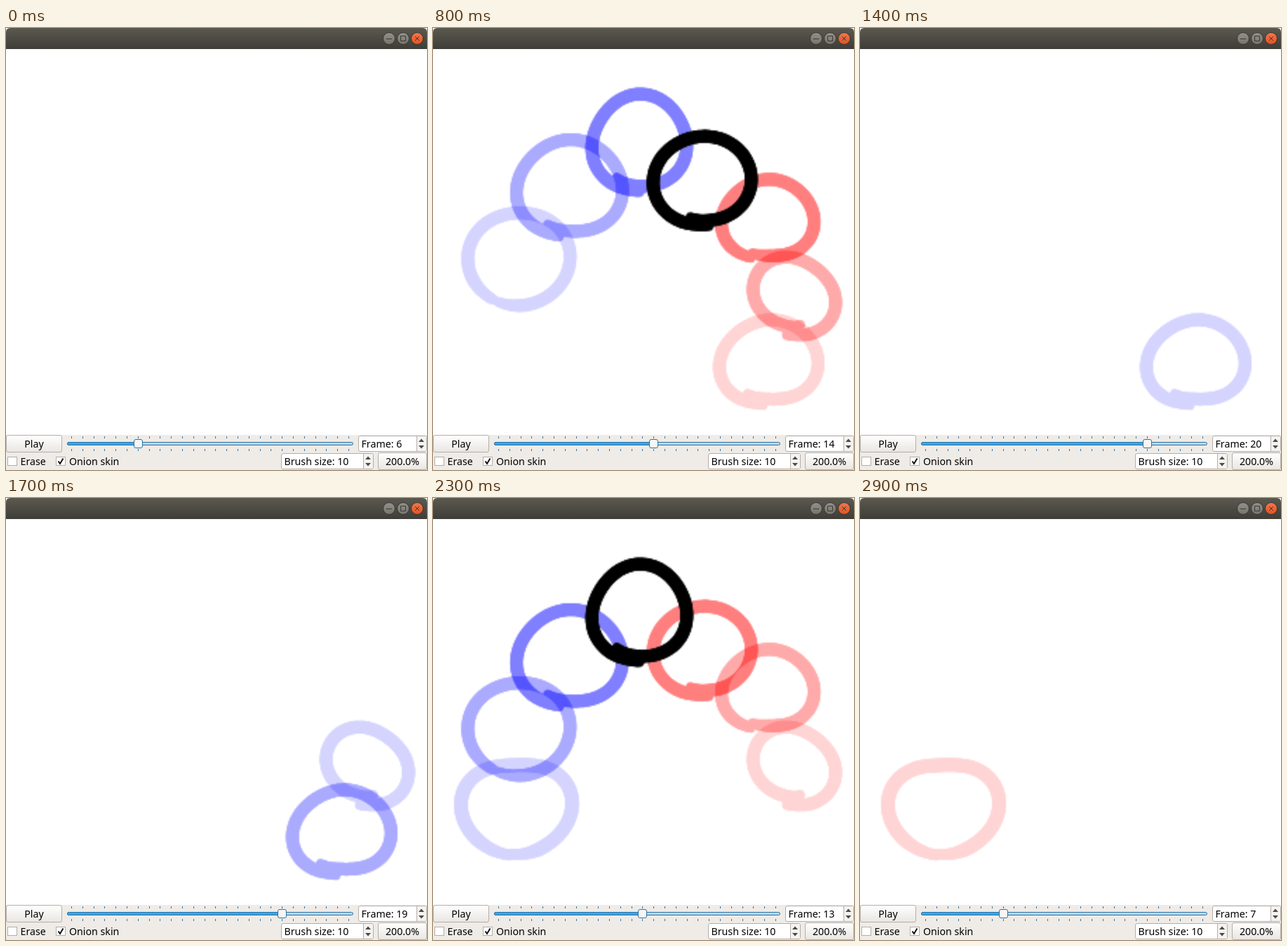
Recreate the animation shown at these times as an HTML page with a canvas. Size 600 by 630 pixels, loop 3000 ms.

```html
<!DOCTYPE html>
<html lang="en">
<head>
<meta charset="utf-8">
<title>Onion skin</title>
<style>
  html, body { margin: 0; width: 100%; height: 100%; overflow: hidden; background: #fff; }
  canvas { position: absolute; left: 0; top: 30px; width: 600px; height: 550px; }
  svg { position: absolute; left: 0; top: 0; }
  text { font: 14.2px "Noto Sans", sans-serif; fill: #000; }
  .edge { stroke: #b4aea8; }
  .blue { stroke: #2a75a8; }
  .icon { fill: none; stroke: #3a3934; }
</style>
</head>
<body>
<canvas id="view" width="300" height="275"></canvas>
<svg width="600" height="630">
  <defs>
    <linearGradient id="bar" x2="0" y2="1"><stop stop-color="#5b594f"/><stop offset="1" stop-color="#3e3d38"/></linearGradient>
    <linearGradient id="button" x2="0" y2="1"><stop stop-color="#fff"/><stop offset="1" stop-color="#e9e6e2"/></linearGradient>
    <linearGradient id="grey" x2="0" y2="1"><stop stop-color="#92908a"/><stop offset="1" stop-color="#75736b"/></linearGradient>
    <linearGradient id="orange" x2="0" y2="1"><stop stop-color="#f4784e"/><stop offset="1" stop-color="#e4511f"/></linearGradient>
    <path id="arrows" d="M-4 -2.5L0 -7L4 -2.5ZM-4 2.5L0 7L4 2.5Z" fill="#4b4a48"/>
  </defs>

  <path d="M0 30V6Q0 0 6 0H594Q600 0 600 6V30Z" fill="url(#bar)"/>
  <g stroke="#38372f">
    <circle cx="546" cy="15" r="8.5" fill="url(#grey)"/>
    <circle cx="566" cy="15" r="8.5" fill="url(#grey)"/>
    <circle cx="586" cy="15" r="8.5" fill="url(#orange)"/>
  </g>
  <path class="icon" d="M542 15.5H550M562.5 11.5H569.5V18.5H562.5ZM583 12L589 18M589 12L583 18"/>

  <rect y="580" width="600" height="50" fill="#efebe7"/>
  <g class="edge" fill="url(#button)">
    <rect x=".5" y="580.5" width="79" height="24" rx="2.5"/>
    <rect x="530.5" y="605.5" width="69" height="24" rx="2.5"/>
  </g>
  <g class="edge" fill="#fff">
    <rect x="502.5" y="581.5" width="97" height="22" rx="2.5"/>
    <rect x="392.5" y="606.5" width="131" height="22" rx="2.5"/>
    <rect x="2.5" y="611.5" width="13" height="12"/>
    <rect x="71.5" y="611.5" width="13" height="12"/>
    <path d="M585.5 582V603M509.5 607V628"/>
  </g>
  <path d="M586 582H597Q599 582 599 584V601Q599 603 597 603H586ZM510 607H521Q523 607 523 609V626Q523 628 521 628H510Z" fill="#f5f3f0"/>
  <use href="#arrows" x="592" y="592.5"/>
  <use href="#arrows" x="516" y="617.5"/>
  <path d="M74.5 617.5L77 621L81.5 613.5" fill="none" stroke="#111" stroke-width="2"/>

  <path id="ticks" class="blue"/>
  <rect class="blue" x="87.5" y="590.5" width="407" height="4" rx="2" fill="#bcd6e8"/>
  <rect class="blue" id="fill" x="87.5" y="590.5" height="4" rx="2" fill="#3fa5e6"/>
  <rect class="blue" id="handle" y="586.5" width="12" height="12" rx="2.5" fill="#f7f6f5"/>

  <text x="40" y="598" text-anchor="middle">Play</text>
  <text x="565" y="623" text-anchor="middle">200.0%</text>
  <text x="20.5" y="623">Erase</text>
  <text x="90" y="623">Onion skin</text>
  <text x="396.5" y="623">Brush size: 10</text>
  <text x="506.5" y="598" id="label"></text>
</svg>

<script>
const $ = id => document.getElementById(id);
const view = $('view').getContext('2d');
const scratch = document.createElement('canvas');
scratch.width = 300;
scratch.height = 275;
const pen = scratch.getContext('2d');
pen.lineCap = 'round';

// Hand-drawn loops by cel number: a wobbly circle, from `start` degrees for some turns
const cels = {
  10: { x: 119, y: 442, r: 71.5, oval: 7.5, bulge: -2.7, start: 98, turns: -1, curl: 1, width: 20 },
  11: { x: 122.5, y: 329, r: 69.5, oval: 3.4, bulge: -0.6, start: 116, turns: -.98, curl: 0 },
  12: { x: 195, y: 228, r: 71, oval: 4.2, start: 121, turns: -1.05, curl: 9 },
  13: { x: 294.5, y: 163.5, r: 67.3, oval: 0, start: 123, turns: -1.09, curl: 9 },
  14: { x: 384, y: 217, r: 66, oval: 4, lean: -1.3, bulge: .5, start: 108, turns: -1.07, curl: 8 },
  15: { x: 477.5, y: 273, r: 60.5, oval: 5.2, start: 115, turns: -1, curl: 4 },
  16: { x: 514.5, y: 381, r: 55.5, oval: 2.5, lean: 5.4, bulge: .4, start: 78, turns: 1.06, curl: 12 },
  17: { x: 479, y: 476, r: 64, oval: 6, lean: -1.6, start: 124, turns: -1.07, curl: 9 },
};

function drawCel({ x, y, r, oval, lean = -.8, bulge = 2, start, turns, curl, width = 18.5 }, color, alpha) {
  const steps = 120;
  // The stroke begins a little inside the loop and ends a little outside it
  const locate = u => {
    const a = start * Math.PI / 180 + u * turns * 2 * Math.PI;
    const radius = r + oval * Math.cos(2 * a) + lean * Math.sin(2 * a) + bulge * Math.sin(3 * a)
      - curl * Math.exp(-12 * u) + curl / 2 * Math.exp(-12 * (1 - u));
    return [x + radius * Math.cos(a), y + radius * Math.sin(a)];
  };
  pen.setTransform(1, 0, 0, 1, 0, 0);
  pen.clearRect(0, 0, 300, 275);
  pen.setTransform(.5, 0, 0, .5, 0, -15);
  pen.strokeStyle = color;
  for (let n = 0; n < steps; n++) {
    const u = n / steps;
    pen.lineWidth = Math.min(width, 14 + 60 * u, 15 + 40 * (1 - u));
    pen.beginPath();
    pen.moveTo(...locate(u));
    pen.lineTo(...locate(u + 1 / steps));
    pen.stroke();
  }
  view.globalAlpha = alpha;
  view.drawImage(scratch, 0, 0);
}

const sliderX = number => 93.5 + Math.round(number * 15.8);
$('ticks').setAttribute('d', Array.from({ length: 26 }, (_, i) =>
  `M${sliderX(i)} 582v3m0 15v3`).join(''));

function show(number) {
  view.clearRect(0, 0, 300, 275);
  for (let distance = 3; distance > 0; distance--) {
    const alpha = (4 - distance) / 6;
    const before = cels[number - distance], after = cels[number + distance];
    if (before) drawCel(before, '#00f', alpha);
    if (after) drawCel(after, '#f00', alpha);
  }
  if (cels[number]) drawCel(cels[number], '#000', 1);

  const x = sliderX(number);
  $('fill').setAttribute('width', x - 87.5);
  $('handle').setAttribute('x', x - 6);
  $('label').textContent = `Frame: ${number}`;
}

// Scrub from 6 up to 21 and back, one cel every 100 ms
let shown;
function tick() {
  const step = Math.floor(performance.now() / 100) % 30;
  const number = 21 - Math.abs(15 - step);
  if (number !== shown) show(shown = number);
  requestAnimationFrame(tick);
}
tick();
</script>
</body>
</html>
```
